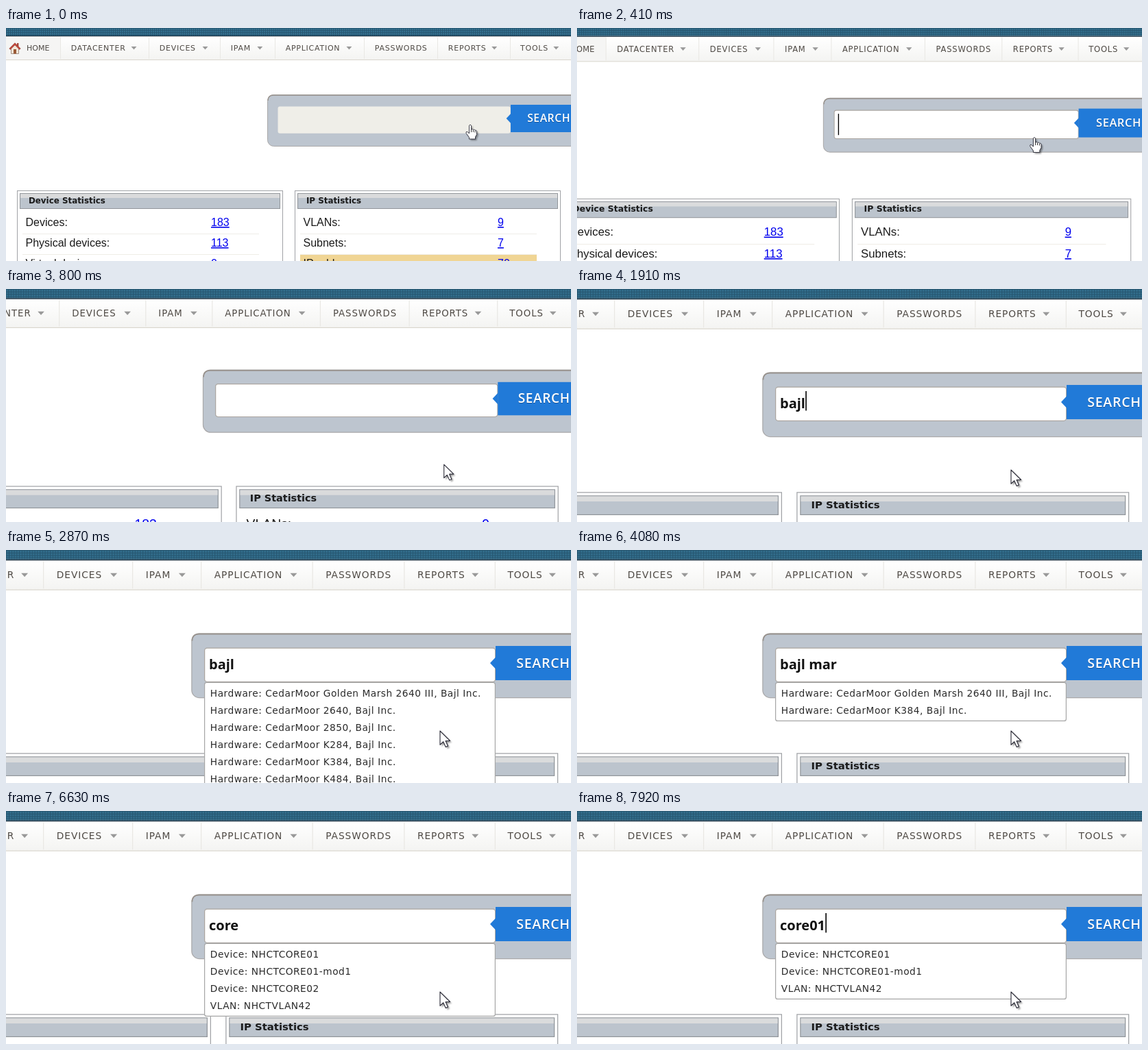
An HTML page for the animation above (8 s loop, 824 px wide and 340 px high).

```html
<!DOCTYPE html>
<html lang="en">
<head>
<meta charset="utf-8">
<title>Search box demo</title>
<style>
  html, body { margin: 0; width: 100%; height: 100%; overflow: hidden; background: #fff; }
  svg { display: block; width: 824px; height: 340px; }
  text { white-space: pre; font-kerning: none; }
  .nav { font: 11px "DejaVu Sans", sans-serif; letter-spacing: .75px; fill: #4f4a45; }
  .home { letter-spacing: .05px; }
  .title { font: bold 11.9px "DejaVu Sans", sans-serif; fill: #1b1b1b; }
  .row { font: 16px "Liberation Sans", sans-serif; fill: #1a1a1a; }
  .link { fill: #00e; text-decoration: underline; }
  .button { font: 600 15.7px "Open Sans", "Noto Sans", sans-serif; letter-spacing: .55px; fill: #fff; }
  .query { font: 700 20px "Noto Sans", "Open Sans", sans-serif; fill: #111; }
  .item { font: 13.75px "DejaVu Sans", sans-serif; letter-spacing: .5px; fill: #2b2b2b; }
  .shadow { filter: blur(.8px); }
</style>
</head>
<body>
<svg viewBox="0 0 824 340">
  <defs>
    <pattern id="weave" width="3" height="3" patternUnits="userSpaceOnUse">
      <rect width="3" height="3" fill="#33708f"/>
      <path d="M0 .5H3M.5 0V3" stroke="#265670" stroke-width=".9"/>
    </pattern>
    <linearGradient id="navFill" x2="0" y2="1">
      <stop offset="0" stop-color="#fff"/><stop offset="1" stop-color="#f4f4f2"/>
    </linearGradient>
  </defs>
  <g id="zoom">
    <g id="page"></g>
    <!-- laid out in settled, fully zoomed pixels -->
    <g transform="translate(164.8) scale(.8)">
      <text id="query" class="query" x="296" y="174"></text>
      <rect id="caret" y="149" width="1.6" fill="#000"/>
      <g id="menu"></g>
    </g>
    <g id="cursor" stroke-linejoin="round">
      <g id="hand"></g>
      <g id="arrow"></g>
    </g>
  </g>
</svg>
<script>
const LOOP = 8000, BLINK = 330, MAX_ZOOM = 1.25;
const byId = id => document.getElementById(id);
const [zoom, page, query, caret, menu, cursor, hand, arrow] =
  ['zoom', 'page', 'query', 'caret', 'menu', 'cursor', 'hand', 'arrow'].map(byId);

function add(parent, tag, attrs, content) {
  const el = document.createElementNS('http://www.w3.org/2000/svg', tag);
  for (const key in attrs) el.setAttribute(key, attrs[key]);
  if (content) el.textContent = content;
  parent.append(el);
  return el;
}
const rect = (x, y, width, height, fill, more) =>
  add(page, 'rect', { x, y, width, height, fill, ...more });
const path = (d, fill, more) => add(page, 'path', { d, fill, ...more });
const label = (x, y, cls, content) => add(page, 'text', { x, y, class: cls }, content);

function drawNav() {
  rect(0, 0, 830, 11, 'url(#weave)');
  rect(0, 12, 830, 34, 'url(#navFill)');
  rect(0, 12, 79, 34, '#f5f5f4');
  rect(0, 11, 830, 1.2, '#10283a');
  rect(0, 46, 830, 1, '#d9d6cd');
  for (const x of [79, 208, 312, 392, 522, 629, 735]) rect(x, 13, 1, 32, '#e9e8e4');

  path('M7.5 29V37.5H18.5V29L13 23.5Z', '#f1e6d8', { stroke: '#8f7a6c', 'stroke-width': .8 });
  rect(16, 22, 2.4, 5, '#a5483a');
  path('M4.8 30L13 21.8L21.2 30L19.8 31.4L13 24.8L6.2 31.4Z', '#c8473a', { stroke: '#8e3a30', 'stroke-width': .7 });
  rect(11, 31, 4, 6.5, '#9b5a36');

  label(30, 33, 'nav home', 'HOME');
  const items = [['DATACENTER', 94.8, 186.5], ['DEVICES', 223.8, 290.5], ['IPAM', 327.8, 370.3],
    ['APPLICATION', 407.7, 500.4], ['PASSWORDS', 537.8], ['REPORTS', 644.8, 712.2], ['TOOLS', 750, 802.3]];
  for (const [name, x, mark] of items) {
    label(x, 33, 'nav', name);
    if (mark) path(`M${mark - 4} 27h8l-4 4.4z`, '#999');
  }
}

function drawSearch() {
  rect(381.5, 97.5, 480, 75, '#bdc5cf', { rx: 9, stroke: '#aaa9aa' });
  path('M382 106Q382 98 390 98H830', 'none', { stroke: '#98928d', 'stroke-width': 1.4 });
  const field = rect(396.5, 114.4, 339.2, 39.4, '#efeee8', { rx: 3 });
  rect(736, 112, 100, 40, '#217ad8');
  path('M736.2 125L729.6 132L736.2 139Z', '#217ad8');
  label(760.2, 138, 'button', 'SEARCH').style.fill = '#14549c';
  label(760.2, 137.2, 'button', 'SEARCH');
  return field;
}

function drawPanel(x, title, rows, valueX, highlight) {
  rect(x + .5, 237.5, 387, 140, '#fff', { stroke: '#a0a2a6' });
  rect(x + 4.5, 241.5, 379, 22, '#bcc4cd', { stroke: '#92969b' });
  rect(x + 5, 242, 378, 6, '#dadbdc');
  label(x + 16.9, 255.7, 'title', title);
  rows.forEach(([name, value], i) => {
    const y = 289 + 30 * i;
    if (i === highlight) rect(x + 8, y - 18, 345, 30, '#f0d594');
    else rect(x + 8, y + 11, 345, 1, '#efede7');
    label(x + 12.5, y, 'row', name);
    label(valueX, y, 'row link', value);
  });
}

function drawCursors() {
  const shapes = [
    [arrow, 'M0 0V16.2L3.8 12.6L6.6 18.8L9.2 17.6L6.5 11.6H11.7Z'],
    [hand, 'M-1.5 1.2Q0 -1 1.5 1.2V7Q3 5.8 4.3 7.4Q6 6.4 7 8.2Q9.2 7.6 9.5 10V14.5L7.5 18V21H-1.5V18.6L-6 12.4Q-6.4 9.6 -4 10.4L-1.5 13Z']
  ];
  for (const [group, d] of shapes) {
    add(group, 'path', { d, class: 'shadow', opacity: .4, transform: 'translate(2 2)' });
    add(group, 'path', { d, fill: '#fff', stroke: '#2c2c38', 'stroke-width': .9 });
  }
  add(hand, 'path', { d: 'M1.5 7V11M4.3 8V11M7 9V11.5', stroke: '#222', 'stroke-width': .9 });
}

drawNav();
const field = drawSearch();
drawPanel(16, 'Device Statistics',
  [['Devices:', '183'], ['Physical devices:', '113'], ['Virtual devices:', '0']], 299);
drawPanel(421, 'IP Statistics',
  [['VLANs:', '9'], ['Subnets:', '7'], ['IP addresses:', '70']], 717, 2);
drawCursors();

// Each entry restarts the caret blink.
const typing = [
  [260, ''], [1350, 'b'], [1550, 'ba'], [1780, 'baj'], [1910, 'bajl'], [2540, 'bajl'],
  [3230, 'bajl '], [3490, 'bajl m'], [3620, 'bajl ma'], [3750, 'bajl mar'], [5200, 'bajl ma'],
  [5530, 'bajl m'], [5560, 'bajl'], [5590, 'baj'], [5620, 'b'], [5650, ''],
  [5880, 'c'], [6110, 'co'], [6180, 'cor'], [6300, 'core'], [6930, 'core'],
  [7130, 'core0'], [7260, 'core01']
];
const model = name => `Hardware: CedarMoor ${name}, Bajl Inc.`;
const marsh = model('Golden Marsh 2640 III'), k384 = model('K384');
const core = ['Device: NHCTCORE01', 'Device: NHCTCORE01-mod1'], vlan = 'VLAN: NHCTVLAN42';
const menus = [
  [0, []],
  [2210, [marsh, model('2640'), model('2850'), model('K284'), k384, model('K484')]],
  [4080, [marsh, k384]],
  [6240, []],
  [6600, [...core, 'Device: NHCTCORE02', vlan]],
  [7560, [...core, vlan]]
];
const cursorPath = [[320, 677, 141], [560, 670.3, 170], [740, 671.2, 211.2]];

const latest = (list, t) => list.findLast(([start]) => start <= t);
const clamp = v => Math.min(1, Math.max(0, v));

function cursorAt(t) {
  const next = cursorPath.findIndex(([time]) => time > t);
  if (next === 0) return cursorPath[0].slice(1);
  if (next < 0) return cursorPath.at(-1).slice(1);
  const [t0, x0, y0] = cursorPath[next - 1], [t1, x1, y1] = cursorPath[next];
  const p = (t - t0) / (t1 - t0);
  return [x0 + (x1 - x0) * p, y0 + (y1 - y0) * p];
}

let shownMenu;
function showMenu(items) {
  if (items === shownMenu) return;
  shownMenu = items;
  menu.replaceChildren();
  if (!items.length) return;
  add(menu, 'rect', { x: 289.6, y: 193.4, width: 423.8, height: 6 + 25 * items.length,
    rx: 3, fill: '#fff', stroke: '#a6a6a6', 'stroke-width': 1.2 });
  items.forEach((item, i) => add(menu, 'text', { x: 297.8, y: 214 + 25 * i, class: 'item' }, item));
}

function render(t) {
  const step = Math.floor((t - 260) / 30);
  const scale = 1 + (MAX_ZOOM - 1) * clamp((step - 1) / 20);
  zoom.setAttribute('transform', `translate(${824 * (1 - scale)}) scale(${scale})`);

  const entry = latest(typing, t);
  field.setAttribute('fill', entry ? '#fff' : '#efeee8');
  field.setAttribute('stroke', entry ? '#aaa5a0' : 'none');
  const typed = entry ? entry[1] : '';
  if (query.textContent !== typed) query.textContent = typed;
  const lit = entry && Math.floor((t - entry[0]) / BLINK) % 2 === 0;
  caret.setAttribute('visibility', lit ? 'visible' : 'hidden');
  caret.setAttribute('x', 296.3 + (typed ? query.getComputedTextLength() : 0));
  caret.setAttribute('height', t < 1350 ? 37 : 28.5);

  showMenu(latest(menus, t)[1]);

  const steppedTime = step < 0 ? 0 : 260 + step * 30;
  const [x, y] = cursorAt(steppedTime);
  cursor.setAttribute('transform', `translate(${x} ${y})`);
  hand.setAttribute('visibility', y < 152 ? 'visible' : 'hidden');
  arrow.setAttribute('visibility', y < 152 ? 'hidden' : 'visible');
}

function tick() {
  render(performance.now() % LOOP);
  requestAnimationFrame(tick);
}
tick();
</script>
</body>
</html>
```
